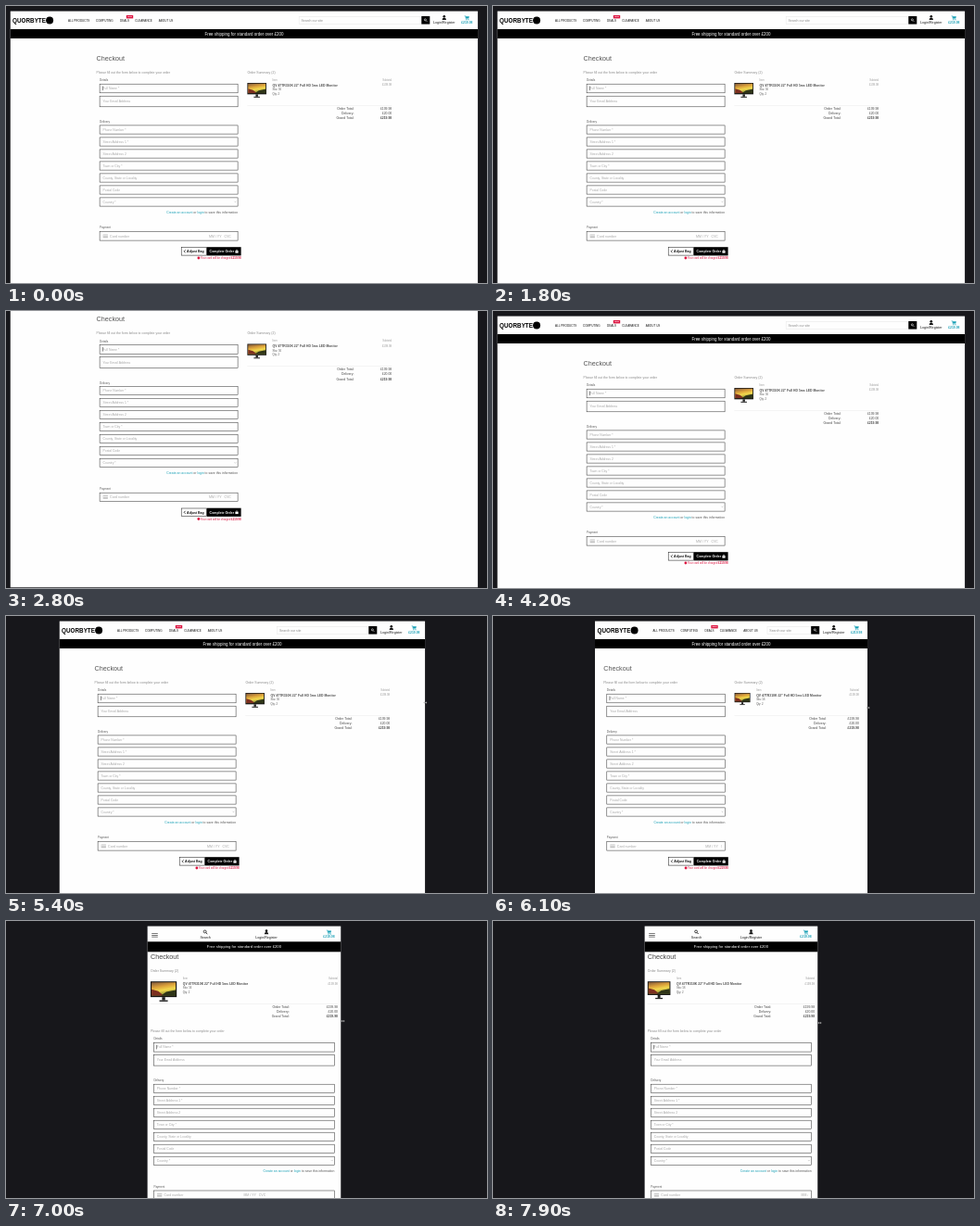
An HTML page with a canvas for the animation above (8 s loop, 519 px wide and 299 px high).

```html
<!DOCTYPE html>
<html lang="en">
<head>
<meta charset="utf-8">
<title>Responsive checkout</title>
<style>
html, body { margin: 0; width: 100%; height: 100%; overflow: hidden; background: #17171b; }
canvas { display: block; width: 519px; height: 299px; }
</style>
</head>
<body>
<canvas id="stage"></canvas>
<script>
const LOOP = 8000, STEP = 100, STAGE_W = 519, STAGE_H = 299;
const PAGE_TOP = 5.6, PAGE_END = 345.8;
const DARK = '#17171b', INK = '#111', GREY = '#888', TEAL = '#179fb5', RED = '#dc1440';

const canvas = document.getElementById('stage');
const dpr = window.devicePixelRatio || 1;
canvas.width = STAGE_W * dpr;
canvas.height = STAGE_H * dpr;
const ctx = canvas.getContext('2d');

// time, left edge, right edge, pointer x offset, pointer y
const RESIZE = [
  [4800, 4.5, 509.3, 2.3, 83],
  [5400, 57.5, 452.3, 0, 93.5],
  [5700, 90, 424, 0, 96],
  [6100, 110, 404.2, .4, 99],
  [6600, 131, 383, 1.5, 104],
  [7000, 152.4, 361.5, 2, 108],
  [7500, 156, 357.5, 2, 109],
  [7900, 163.4, 350.5, 2, 110]
];
const SCROLL = [[2000, 0], [2500, 46.5], [2600, 46.5], [2800, 47.5], [3400, 47.5], [3700, 0]];
// time, distance of the expiry hint from the card field's right edge
const EXPIRY = [[0, 31], [5800, 21], [6700, 98], [7500, 11]];

function sample(table, t) {
  if (t <= table[0][0]) return table[0].slice(1);
  const next = table.findIndex(row => row[0] > t);
  if (next < 0) return table[table.length - 1].slice(1);
  const a = table[next - 1], b = table[next];
  const k = (t - a[0]) / (b[0] - a[0]);
  return a.slice(1).map((v, i) => v + (b[i + 1] - v) * k);
}

function box(x, y, w, h, color) {
  ctx.fillStyle = color;
  ctx.fillRect(x, y, w, h);
}

function outline(x, y, w, h, color = '#2a2a2a', weight = .5) {
  ctx.strokeStyle = color;
  ctx.lineWidth = weight;
  ctx.strokeRect(x, y, w, h);
}

function disc(x, y, r, color) {
  ctx.fillStyle = color;
  ctx.beginPath();
  ctx.arc(x, y, r, 0, Math.PI * 2);
  ctx.fill();
}

function polygon(points, color) {
  ctx.fillStyle = color;
  ctx.beginPath();
  points.forEach(([x, y]) => ctx.lineTo(x, y));
  ctx.fill();
}

function stroke(points, color, weight) {
  ctx.strokeStyle = color;
  ctx.lineWidth = weight;
  ctx.beginPath();
  points.forEach(([x, y]) => ctx.lineTo(x, y));
  ctx.stroke();
}

// Type is set ten times larger and scaled down, so small sizes keep exact spacing.
// y is the middle of the capitals; the return value is the width.
function text(str, x, y, size, color = INK, align = 'left', weight = 400) {
  ctx.save();
  ctx.translate(x, y + size * .35);
  ctx.scale(.1, .1);
  ctx.font = `${weight} ${size * 10}px "Liberation Sans", Arial, sans-serif`;
  ctx.textAlign = align;
  ctx.fillStyle = color;
  ctx.fillText(str, 0, 0);
  const width = ctx.measureText(str).width / 10;
  ctx.restore();
  return width;
}

function magnifier(x, y, s, color) {
  ctx.strokeStyle = color;
  ctx.lineWidth = s * .4;
  ctx.beginPath();
  ctx.arc(x - s * .25, y - s * .25, s * .75, 0, Math.PI * 2);
  ctx.stroke();
  stroke([[x + s * .3, y + s * .3], [x + s * 1.1, y + s * 1.1]], color, s * .5);
}

function person(x, y) {
  disc(x, y - 1.2, 1.35, INK);
  ctx.beginPath();
  ctx.arc(x, y + 2.4, 2.2, Math.PI, 0);
  ctx.fill();
}

function cart(x, y) {
  stroke([[x - 2.6, y - 2], [x - 1.7, y - 2], [x - .9, y + 1.2], [x + 2, y + 1.2]], TEAL, .6);
  polygon([[x - 1.5, y - 1.5], [x + 2.6, y - 1.5], [x + 2, y + .6], [x - 1, y + .6]], TEAL);
  disc(x - .6, y + 2.1, .55, TEAL);
  disc(x + 1.7, y + 2.1, .55, TEAL);
}

function padlock(x, y) {
  ctx.strokeStyle = '#fff';
  ctx.lineWidth = .6;
  ctx.beginPath();
  ctx.arc(x, y - .5, 1, Math.PI, 0);
  ctx.stroke();
  box(x - 1.6, y - .5, 3.2, 2.3, '#fff');
}

function wideHeader(L, R) {
  text('QUORBYTE', L + 2.5, 15.5, 6.35, '#000', 'left', 700);
  disc(L + 42.6, 15.5, 4, '#000');
  [['ALL PRODUCTS', 62.5], ['COMPUTING', 92.5], ['DEALS', 118.5], ['CLEARANCE', 134.7], ['ABOUT US', 160.3]]
    .forEach(([label, dx]) => text(label, L + dx, 15.6, 3.05));
  box(L + 125.3, 10, 7.4, 3.4, RED);
  text('NEW', L + 129, 11.7, 2.2, '#fff', 'center', 700);

  const searchL = L + Math.max(186, 235 + .695 * (R - L - 394.5));
  outline(searchL, 11.3, R - 61 - searchL, 8, '#e6e6e6');
  text('Search our site', searchL + 2.3, 15.4, 3.5, GREY);
  box(R - 61, 11, 9, 8.6, '#000');
  magnifier(R - 56.6, 15.2, 1.4, '#fff');
  person(R - 36.5, 12.5);
  text('Login/Register', R - 36.5, 17.7, 3.64, INK, 'center');
  cart(R - 12, 12.7);
  text('£219.98', R - 12, 17.7, 3.4, TEAL, 'center', 700);
}

function compactHeader(L, R) {
  const W = R - L;
  [13.2, 15, 16.8].forEach(y => box(L + 4.8, y, 6.6, .6, '#222'));
  magnifier(L + W * .3, 11.9, 1.9, INK);
  text('Search', L + W * .3, 17.3, 3.6, INK, 'center');
  person(L + W * .615, 11.9);
  text('Login/Register', L + W * .615, 17.3, 3.64, INK, 'center');
  cart(R - 13, 12);
  text('£219.98', R - 13, 17.3, 3.4, TEAL, 'center', 700);
}

function monitor(x, y, w) {
  const h = w * .6;
  ctx.save();
  ctx.translate(x, y);
  ctx.scale(w, h);
  box(0, 0, 1, 1, '#151413');
  const sky = ctx.createLinearGradient(0, 0, .3, 1);
  sky.addColorStop(0, '#6e4a3c');
  sky.addColorStop(.4, '#dba03a');
  sky.addColorStop(.65, '#f3d94e');
  sky.addColorStop(1, '#6f7a2c');
  box(.04, .06, .92, .84, sky);
  polygon([[.04, .5], [.3, .62], [.5, .9], [.04, .9]], '#7c2f20');
  polygon([[.4, .9], [.6, .66], [.96, .55], [.96, .9]], '#2f3518');
  ctx.restore();
  box(x + w * .44, y + h, w * .12, w * .12, '#222');
  box(x + w * .34, y + h + w * .12, w * .32, w * .05, '#222');
}

function summary(x, right, dy) {
  const span = right - x + 7, itemX = x + span / 6;
  const totalX = right - span / 4;
  text('Order Summary (2)', x, 71.6 + dy, 3.5, GREY);
  text('Item', itemX, 79.7 + dy, 2.7, '#999');
  text('Subtotal', right, 79.7 + dy, 2.7, '#999', 'right');
  monitor(x, 83 + dy, span / 6 - 6.6);
  text('QV 47TR310K 22" Full HD 5ms LED Monitor', itemX, 85.7 + dy, 3.4, '#4a4a4a', 'left', 700);
  text('£199.98', right, 85.3 + dy, 2.9, '#999', 'right');
  text('Sku: 56', itemX, 90.3 + dy, 2.8, '#555');
  text('Qty: 2', itemX, 94.6 + dy, 2.8, '#555');
  box(x, 107 + dy, right - x, .5, '#e8e8e8');
  [['Order Total:', '£199.98', 400], ['Delivery:', '£20.00', 400], ['Grand Total:', '£219.98', 700]]
    .forEach(([label, value, weight], i) => {
      const y = 110.4 + i * 5.3 + dy;
      text(label, totalX, y, 3.5, '#444', 'right');
      text(value, right, y, 3.4, '#444', 'right', weight);
    });
}

function field(x, right, y, h, label) {
  outline(x, y - h / 2, right - x, h);
  text(label, x + 3.4, y, 3.4, '#a6a6a6');
}

function form(x, right, dy, expiryGap) {
  const fx = x + 3.5, fr = right - 3.5;
  text('Please fill out the form below to complete your order', x, 71.6 + dy, 3.45, GREY);

  text('Details', fx, 80 + dy, 3, '#555');
  field(fx, fr, 89 + dy, 9.6, 'Full Name *');
  box(fx + 2.9, 86.5 + dy, .5, 4.6, '#222');
  field(fx, fr, 103 + dy, 11.6, 'Your Email Address');

  text('Delivery', fx, 125 + dy, 3, '#555');
  ['Phone Number *', 'Street Address 1 *', 'Street Address 2', 'Town or City *',
    'County, State or Locality', 'Postal Code', 'Country *']
    .forEach((label, i) => field(fx, fr, 133.5 + i * 13 + dy, 9.2, label));
  const ay = 211.3 + dy;
  stroke([[fr - 3.6, ay - .5], [fr - 2.7, ay + .5], [fr - 1.8, ay - .5]], '#999', .4);

  let end = fr;
  [[' to save this information', '#555'], ['login', TEAL], [' or ', '#555'], ['Create an account', TEAL]]
    .forEach(([part, color]) => { end -= text(part, end, 222.5 + dy, 3.45, color, 'right'); });

  text('Payment', fx, 239.3 + dy, 3, '#555');
  const cy = 248.4 + dy;
  outline(fx, cy - 4.7, fr - fx, 9.4);
  ctx.save();
  ctx.beginPath();
  ctx.rect(fx, cy - 5, fr - fx - 3.5, 10);
  ctx.clip();
  box(fx + 3.6, cy - 1.9, 5.2, 3.8, '#c4c4c4');
  box(fx + 3.6, cy - .9, 5.2, .8, '#fff');
  text('Card number', fx + 11, cy, 3.6, '#a6a6a6');
  text('MM / YY   CVC', fr - expiryGap, cy, 3.5, '#a6a6a6');
  ctx.restore();

  const by = 260.2 + dy, mid = by + 4.6;
  outline(right - 64.4, by + .3, 27, 8.6, '#111');
  stroke([[right - 60, mid - 1.5], [right - 61.5, mid], [right - 60, mid + 1.5]], INK, .8);
  text('Adjust Bag', right - 58.5, mid, 3.5, INK, 'left', 700);
  box(right - 37, by, 37, 9.2, '#000');
  text('Complete Order', right - 34, mid, 3.5, '#fff', 'left', 700);
  padlock(right - 4.6, mid);

  const noteY = 272 + dy;
  const priceW = text('£219.98', right, noteY, 2.9, RED, 'right', 700);
  const noteW = text('Your card will be charged ', right - priceW, noteY, 2.9, RED, 'right');
  disc(right - priceW - noteW - 2, noteY, 1.4, RED);
}

function page(L, R, scroll, expiryGap) {
  const W = R - L, cx = (L + R) / 2, compact = W < 285;
  ctx.save();
  ctx.beginPath();
  ctx.rect(L, 0, W, STAGE_H);
  ctx.clip();
  ctx.translate(0, -scroll);
  box(L, PAGE_TOP, W, PAGE_END - PAGE_TOP, '#fefefe');

  const half = compact ? Math.min(101, W / 2 - 3.4) : W >= 345 ? 159.3 : 137.8;
  const left = cx - half, right = cx + half;
  if (compact) {
    compactHeader(L, R);
    box(L, 22.3, W, 11, '#000');
    text('Free shipping for standard order over £200', cx, 28, 4.22, '#fff', 'center');
    text('Checkout', left, 38.5, 7.2, '#444');
    summary(left, right, -17.8);
    form(left, right, 47.3, expiryGap);
  } else {
    wideHeader(L, R);
    box(L, 25, W, 10, '#000');
    text('Free shipping for standard order over £200', cx, 30, 4.47, '#fff', 'center');
    text('Checkout', left, 56.2, 7.2, '#555');
    summary(cx + 3.5, right, 0);
    form(left, cx - 3.3, 0, expiryGap);
  }
  ctx.restore();
}

function resizePointer(x, y) {
  const color = '#b8b8b8';
  box(x - 1.3, y - .3, 2.6, .6, color);
  [-1, 1].forEach(side =>
    polygon([[x + side * 2, y], [x + side * .8, y - 1.2], [x + side * .8, y + 1.2]], color));
}

function draw(t) {
  ctx.setTransform(dpr, 0, 0, dpr, 0, 0);
  box(0, 0, STAGE_W, STAGE_H, DARK);
  const [L, R, pointerDx, pointerY] = sample(RESIZE, t);
  const [scroll] = sample(SCROLL, t);
  const expiryGap = EXPIRY.filter(([at]) => at <= t).pop()[1];
  page(L, R, scroll, expiryGap);
  if (t >= 4500) resizePointer(R + pointerDx, pointerY);
}

const start = performance.now();
function tick() {
  const t = (performance.now() - start) % LOOP;
  draw(Math.floor(t / STEP) * STEP);
  requestAnimationFrame(tick);
}
tick();
</script>
</body>
</html>
```
